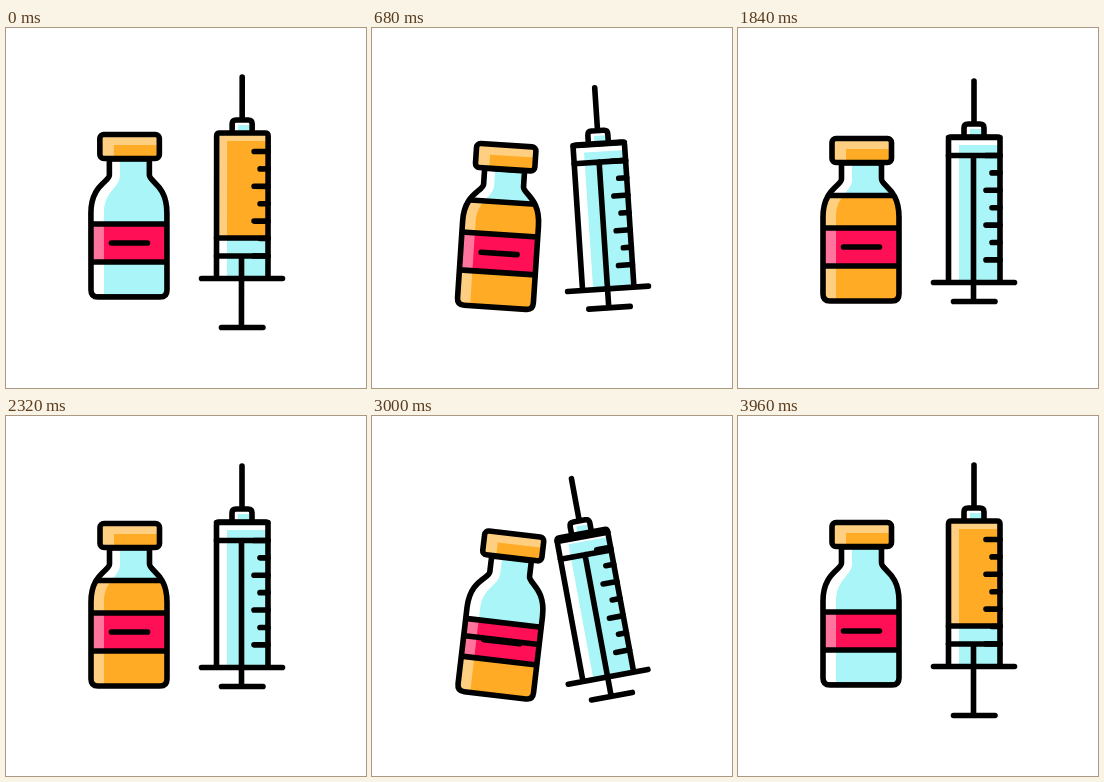
Write an HTML page that moves like this. It is 360 by 360 pixels and loops after 4 s.

```html
<!DOCTYPE html>
<html lang="en">
<head>
<meta charset="utf-8">
<title>Vial and syringe</title>
<style>
  html, body { margin: 0; height: 100%; overflow: hidden; background: #fff; }
  svg { display: block; width: 100%; height: 100%; }
  .line { fill: none; stroke: #000; stroke-width: 5.6; stroke-linecap: round; stroke-linejoin: round; }
  .glass { fill: #aaf5f7; }
  .liquid { fill: #ffab25; }
  .label { fill: #ff0f55; }
  .shine { fill: #fff; opacity: .42; }
</style>
</head>
<body>
<svg viewBox="0 0 360 360">
  <defs>
    <path id="bottle" d="M103.5 131V147C103.5 154 85 157 85 185V262Q85 269 92 269H154Q161 269 161 262V185C161 157 143.5 154 143.5 147V131Z"/>
    <clipPath id="inside"><use href="#bottle"/></clipPath>
  </defs>

  <g id="vial">
    <g clip-path="url(#inside)">
      <path fill="#fff" d="M80 130H165V272H80Z"/>
      <path class="glass" d="M114 130H165V272H98V185C98 163 114 160 114 147Z"/>
      <rect id="vialLiquid" class="liquid" x="80" width="85"/>
      <path class="label" d="M80 196H165V234H80Z"/>
      <path class="shine" d="M80 130H114V147C114 160 98 163 98 185V272H80Z"/>
      <path id="surface" class="line"/>
      <path class="line" d="M85 196H161M85 234H161"/>
    </g>
    <path class="line" d="M105.500 215H141.500"/>
    <use href="#bottle" class="line"/>
    <rect class="liquid" x="94" y="106.500" width="59.500" height="24" rx="4"/>
    <path class="shine" d="M95 107H153V117H108V130H95Z"/>
    <rect class="line" x="94" y="106.500" width="59.500" height="24" rx="4"/>
  </g>

  <g id="syringe">
    <path fill="#fff" d="M210.500 105H262V250H210.500Z"/>
    <path class="glass" d="M221 113H262V250H221ZM232 97H246V104H232Z"/>
    <rect id="dose" class="liquid" x="210.500" y="105" width="51.500"/>
    <path class="shine" d="M210.500 105H262V113H221V250H210.500Z"/>
    <path id="ticks" class="line"/>
    <path id="plunger" class="line"/>
    <path class="line" d="M236 49V91M226 104V96Q226 92 230 92H242Q246 92 246 96V104M210.500 250V108Q210.500 105 213.500 105H259Q262 105 262 108V250M195.500 250.500H276.500"/>
  </g>
</svg>
<script>
const LOOP = 4000;
const INJECT = 0, REFILL = 2720;
const $ = id => document.getElementById(id);
const clamp = x => Math.min(1, Math.max(0, x));
const mix = (a, b, k) => a + (b - a) * k;

// Eased 0 to 1 between two times.
function ease(t, start, end) {
  const x = clamp((t - start) / (end - start));
  return x * x * (3 - 2 * x);
}

// One lean and a smaller, shorter lean back.
function swing(t, start) {
  const lobe = (from, length) => Math.sin(Math.PI * clamp((t - from) / length));
  return lobe(start, 590) - .57 * lobe(start + 590, 440);
}

function pose(id, y, angle, pivotX, pivotY) {
  $(id).setAttribute("transform", `translate(0 ${y}) rotate(${angle} ${pivotX} ${pivotY})`);
}

function draw(now) {
  const t = now % LOOP;
  const inject = swing(t, INJECT), refill = swing(t, REFILL);
  const drop = 10.3 * (ease(t, 0, 480) - ease(t, 680, 2700) + ease(t, 2660, 3000) - ease(t, 3180, 3860));
  pose("vial", drop, 6.7 * refill - 11 * inject, 123, 269);
  pose("syringe", drop, 11 * inject - 10.5 * refill, 236, 250);

  const level = mix(269, 163.5, ease(t, 220, 620) - ease(t, 2760, 3260));
  $("vialLiquid").setAttribute("y", level);
  $("vialLiquid").setAttribute("height", 272 - level);
  $("surface").setAttribute("d", `M80 ${level}H165`);

  const push = ease(t, 200, 540) - ease(t, 2970, 3290);
  const head = mix(210, 105.5, push);
  const handle = mix(299.5, 269.5, push);
  $("dose").setAttribute("height", head - 105);
  $("plunger").setAttribute("d",
    `M210.5 ${head}H262M210.5 ${head + 18}H262M235.5 ${head + 18}V${handle}M215.5 ${handle}H257`);

  requestAnimationFrame(draw);
}

$("ticks").setAttribute("d", Array.from({ length: 7 }, (_, i) =>
  `M${i % 2 ? 254 : 248} ${123.5 + 17.4 * i}H262`).join(""));
draw(0);
</script>
</body>
</html>
```
